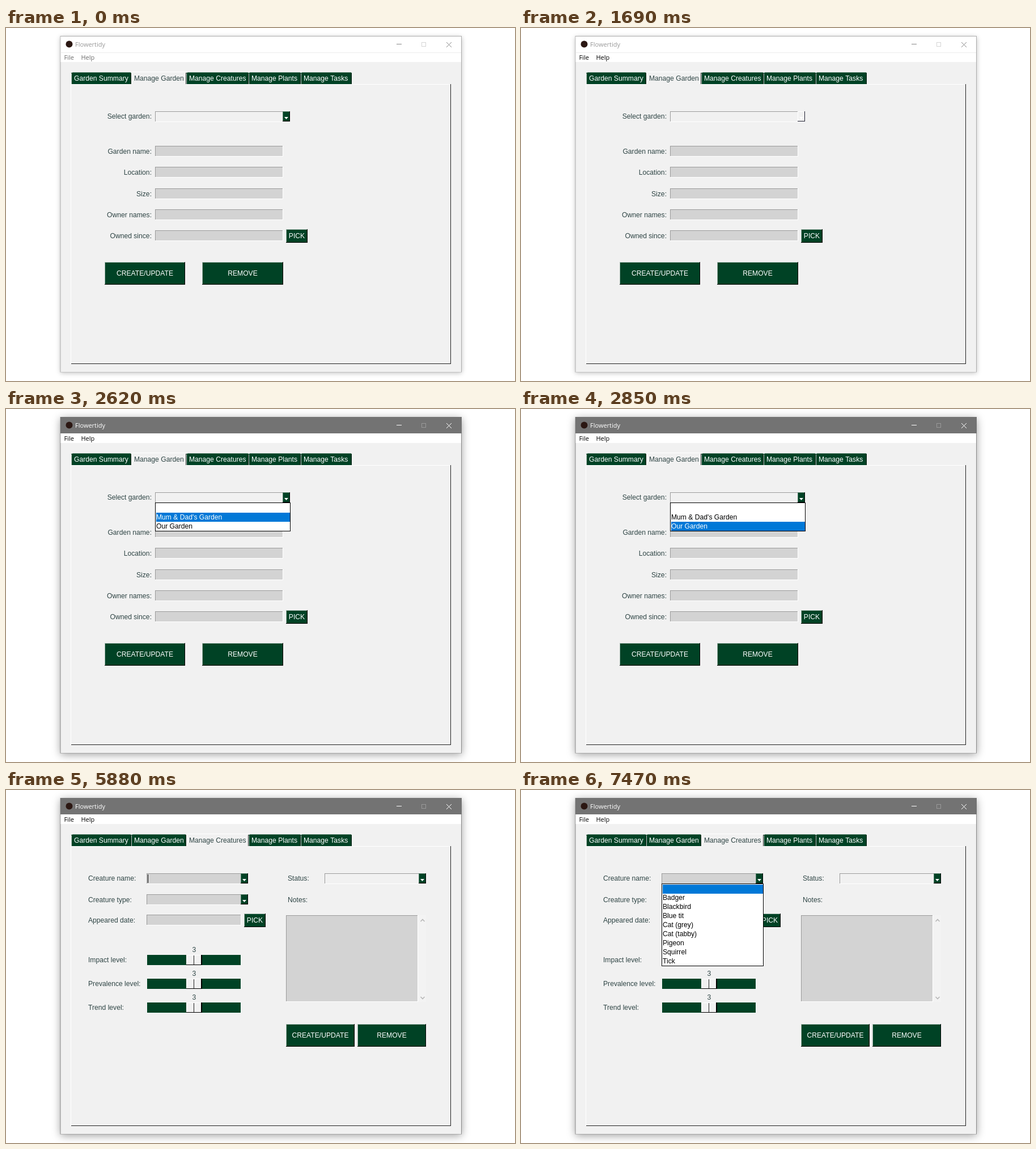
Animation, 898 px wide and 623 px high, one loop 8000 ms. Source, as an HTML page with a canvas:

```html
<!DOCTYPE html>
<html lang="en">
<head>
<meta charset="utf-8">
<style>
html, body { margin: 0; width: 100%; height: 100%; overflow: hidden; background: #fff; }
canvas { display: block; }
</style>
</head>
<body>
<canvas id="stage" width="898" height="623"></canvas>
<script>
const ctx = document.getElementById('stage').getContext('2d');
const LOOP = 8000;
const GREEN = '#004225', FACE = '#f1f1f1', FIELD = '#d3d3d3', INK = '#2f4545', BLUE = '#0078d7';
const UI = '12.15px "Liberation Sans", Arial, sans-serif';
const CHROME = '11px "Open Sans", sans-serif';

function rect(x, y, w, h, color) {
  ctx.fillStyle = color;
  ctx.fillRect(x, y, w, h);
}

// y is the vertical centre of the capitals
function text(s, x, y, color = INK, align = 'left', font = UI) {
  ctx.font = font;
  ctx.fillStyle = color;
  ctx.textAlign = align;
  ctx.fillText(s, x, y + 4);
}

function path(points, color, width = 1) {
  ctx.beginPath();
  points.forEach(([x, y]) => ctx.lineTo(x, y));
  ctx.strokeStyle = color;
  ctx.lineWidth = width;
  ctx.stroke();
}

function bevel(x, y, w, h, fill, light, dark) {
  rect(x, y, w, h, dark);
  rect(x, y, w - 1, h - 1, light);
  rect(x + 1, y + 1, w - 2, h - 2, fill);
}

function field(x, y, w, h = 19, fill = FIELD) {
  bevel(x, y, w, h, fill, '#9b9b9b', '#fff');
}

function button(label, x, y, w, h) {
  bevel(x, y, w, h, GREEN, '#a9bdb3', '#000');
  text(label, x + w / 2, y + h / 2, '#fff', 'center');
}

function combo(x, y, w, fill, hover = false) {
  field(x, y, w, 19, fill);
  const left = x + w - 1;
  bevel(left, y, 13, 18, hover ? FACE : GREEN, hover ? '#fff' : '#5d8571', hover ? '#223' : '#000');
  ctx.fillStyle = '#fff';
  ctx.beginPath();
  ctx.moveTo(left + 3, y + 10);
  ctx.lineTo(left + 10, y + 10);
  ctx.lineTo(left + 6.5, y + 14);
  ctx.fill();
}

function list(x, y, w, h, items, selected) {
  rect(x, y, w, h, '#000');
  rect(x + 1, y + 1, w - 2, h - 2, '#fff');
  const pitch = (h - 3) / items.length;
  items.forEach((item, i) => {
    const top = Math.round(y + 1.5 + i * pitch);
    if (i === selected) rect(x + 2, top, w - 3, 16, BLUE);
    text(item, x + 2, top + 8, i === selected ? '#fff' : '#000');
  });
}

function drawWindow(active, menuActive) {
  rect(0, 0, 898, 623, '#fff');
  ctx.save();
  ctx.shadowColor = active ? 'rgba(0,0,0,.38)' : 'rgba(0,0,0,.25)';
  ctx.shadowBlur = active ? 14 : 8;
  ctx.shadowOffsetY = active ? 3 : 2;
  rect(96, 14, 708, 593, FACE);
  ctx.restore();
  rect(95.5, 14, 708.5, 593.5, active ? '#8b8b8b' : '#adadad');
  rect(96.5, 15, 706.5, 592, FACE);
  rect(96.5, 15, 706.5, 45, '#fff');
  if (active) rect(96, 14, 708, 29, '#737373');
  else rect(96.5, 43, 706.5, 1, '#ececec');

  ctx.fillStyle = '#2b1712';
  ctx.beginPath();
  ctx.arc(111.5, 28.5, 6, 0, 7);
  ctx.fill();
  text('Flowertidy', 122, 29, active ? '#fff' : '#999', 'left', CHROME);
  const icon = active ? '#fff' : '#888';
  rect(689, 28, 9, 1, icon);
  ctx.strokeStyle = active ? '#999' : '#d5d5d5';
  ctx.lineWidth = 1;
  ctx.strokeRect(733.5, 25.5, 7, 7);
  path([[777, 25], [786, 34]], icon);
  path([[786, 25], [777, 34]], icon);
  const menuInk = menuActive ? '#000' : '#6d6d6d';
  text('File', 102.5, 52, menuInk, 'left', CHROME);
  text('Help', 132.5, 52, menuInk, 'left', CHROME);
}

function drawTabs(selected) {
  rect(114, 99, 671, 1, '#fff');
  rect(114, 99, 1, 494, '#fff');
  rect(784, 99, 1, 494, '#222');
  rect(115, 592, 670, 1, '#222');
  const edges = [115, 221, 318, 428, 520, 610];
  ['Garden Summary', 'Manage Garden', 'Manage Creatures', 'Manage Plants', 'Manage Tasks'].forEach((name, i) => {
    const x = edges[i], end = edges[i + 1], on = i === selected;
    if (on) {
      rect(x, 77, end - x, 23, FACE);
      rect(x + 1, 77, end - x - 2, 1, '#fff');
      rect(x, 79, 1, 20, '#fff');
      rect(end - 1, 79, 1, 20, '#333');
    } else {
      rect(x + 2, 78, end - x - 3, 1, '#5d8571');
      rect(x, 79, end - x, 20, GREEN);
      rect(x, 80, 1, 19, '#c4d2ca');
      rect(end - 1, 80, 1, 19, '#001a0e');
    }
    text(name, x + 5, 89, on ? INK : '#fff');
  });
}

function drawGardenPage(filled, hover, selected) {
  const values = ['Our Garden', 'Chilbury', '0.3', 'Finn Rosalind Toby', '01/02/2015'];
  text('Select garden:', 257, 156, INK, 'right');
  combo(263, 147, 226, FACE, hover);
  if (filled) {
    bevel(264, 148, 65, 16, FACE, '#fff', '#000');
    text('Our Garden', 265, 156, '#000');
  }
  ['Garden name:', 'Location:', 'Size:', 'Owner names:', 'Owned since:'].forEach((label, i) => {
    const y = Math.round(208 + i * 37.3);
    text(label, 257, y + 10, INK, 'right');
    field(263, y, 226);
    if (filled) text(values[i], 265, y + 10, '#111');
  });
  button('PICK', 494, 355, 38, 24);
  button('CREATE/UPDATE', 174, 413, 142, 40);
  button('REMOVE', 346, 413, 143, 40);
  if (selected >= 0) list(263, 165, 239, 51, ['', "Mum & Dad's Garden", 'Our Garden'], selected);
}

function slider(label, y) {
  text(label, 145, y);
  text('3', 332, y - 18, INK, 'center');
  rect(249, y - 9, 165, 18, GREEN);
  bevel(318, y - 9, 28, 18, FACE, '#fff', '#000');
  rect(344, y - 9, 1, 18, '#000');
  rect(331, y - 8, 1, 16, '#222');
}

function drawCreaturePage(cursor, hover, open) {
  text('Creature name:', 145, 156);
  combo(248, 147, 167, FIELD, hover);
  if (cursor) rect(250, 149, 1, 15, '#000');
  text('Creature type:', 145, 194);
  combo(248, 184, 167, FIELD);
  text('Appeared date:', 145, 230);
  field(248, 220, 167);
  button('PICK', 420, 218, 38, 24);
  slider('Impact level:', 300);
  slider('Prevalence level:', 342);
  slider('Trend level:', 384);

  text('Status:', 497, 156);
  combo(562, 147, 167, FACE);
  text('Notes:', 497, 194);
  field(494, 221, 233, 153);
  rect(727, 221, 14, 153, '#f3f3f3');
  path([[731.5, 232], [735, 228.5], [738.5, 232]], '#b8b8b8', 1.6);
  path([[731.5, 365], [735, 368.5], [738.5, 365]], '#b8b8b8', 1.6);
  button('CREATE/UPDATE', 494, 413, 121, 40);
  button('REMOVE', 620, 413, 121, 40);
  if (open) list(248, 165, 180, 146,
    ['', 'Badger', 'Blackbird', 'Blue tit', 'Cat (grey)', 'Cat (tabby)', 'Pigeon', 'Squirrel', 'Tick'], 0);
}

function draw(t) {
  const during = (from, to) => t >= from && t < to;
  const onCreatures = t >= 5880;
  drawWindow(t >= 1780, t >= 1690);
  drawTabs(onCreatures ? 2 : 1);
  if (onCreatures) {
    drawCreaturePage(during(5880, 6520) || during(6840, 7380), during(7150, 7470), t >= 7470);
  } else {
    const selected = during(1780, 3250) ? (t >= 2620) + (t >= 2850) : -1;
    drawGardenPage(t >= 3250, during(1290, 1780), selected);
  }
}

const start = performance.now();
function frame() {
  draw((performance.now() - start) % LOOP);
  requestAnimationFrame(frame);
}
frame();
</script>
</body>
</html>
```
